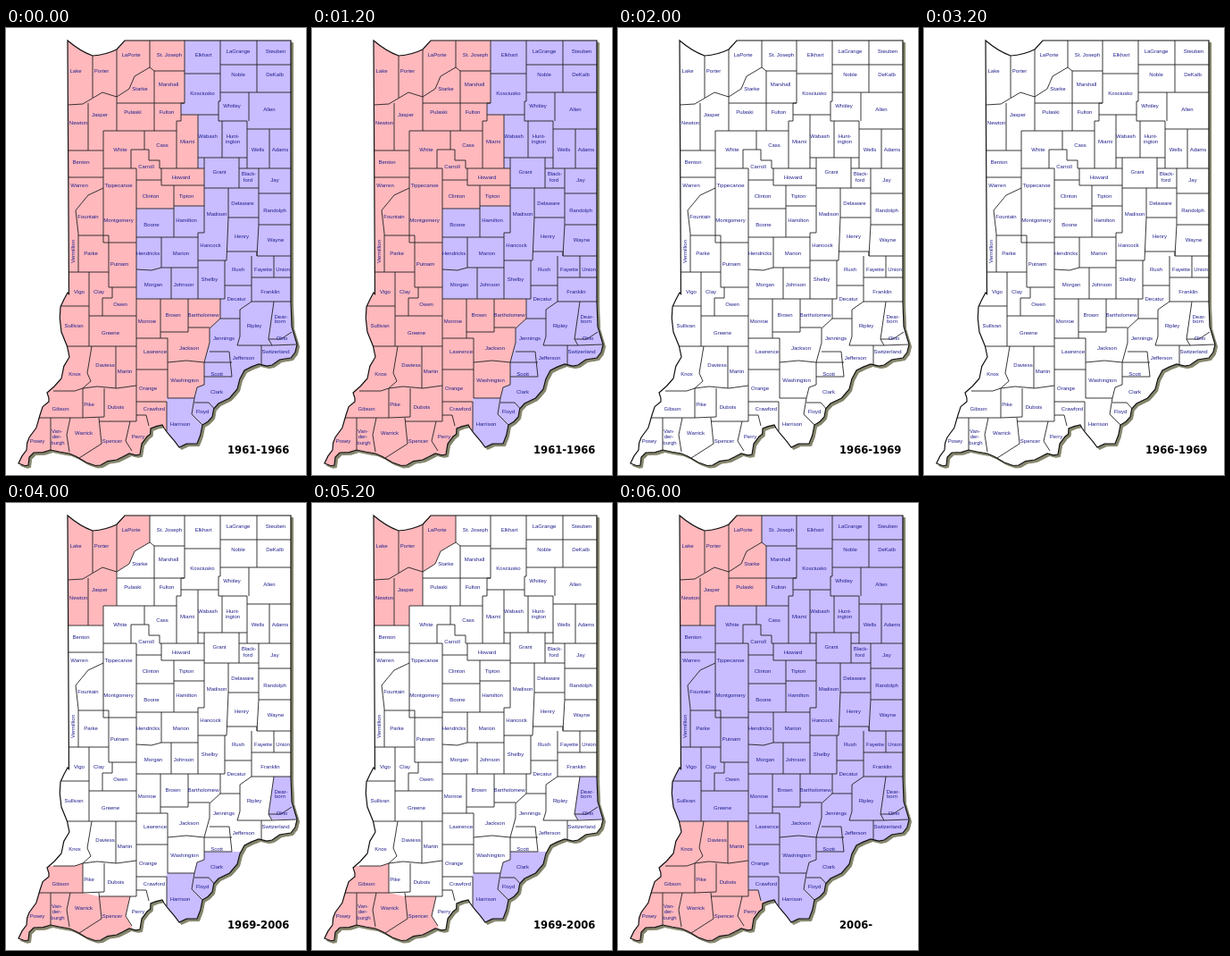
An HTML page for the animation above (8 s loop, 336x500 px).

```html
<!DOCTYPE html>
<html lang="en">
<head>
<meta charset="utf-8">
<title>Indiana time zones</title>
<style>
html, body { margin: 0; width: 100%; height: 100%; overflow: hidden; background: #fff; }
svg { display: block; width: 336px; height: 500px; }
#labels { font: 6px "Liberation Sans", Arial, sans-serif; fill: #20208c; text-anchor: middle; }
#year { font: bold 11.6px "DejaVu Sans", Verdana, sans-serif; }
#lines { fill: none; stroke: #222; stroke-width: .9; }
</style>
</head>
<body>
<svg viewBox="0 0 336 500">
  <defs>
    <path id="state"/>
    <clipPath id="clip"><use href="#state"/></clipPath>
  </defs>
  <use href="#state" x="2.5" y="2.5" fill="#85856c" stroke="#85856c"/>
  <use href="#state" fill="#fff"/>
  <g clip-path="url(#clip)">
    <path id="base" d="M0 0H336V500H0Z"/>
    <path id="pink" fill="#ffb8bc"/>
    <path id="purple" fill="#c9bcff"/>
    <g id="lines">
      <path d="M97 31V78M124 24V115M69 86L86 85 108 72 124 77 138 68 144 54 161 44V14M161 44L166 48H200M166 48V115M124 84H200M92 84V137M69 137H109M109 240V115H191"/>
      <path d="M200 14V84H196V97H238M191 157V104H196V97M200 51H240M240 14V82H238V104H270V157M240 41H319M281 14V72M240 72H319M272 72V104M270 113H319M295 113V157M215 97V157M242 104V145"/>
      <path d="M69 167H109M109 157H146V440M155 115V136H140V157M155 136H160V148H172V157H222M174 157V176H222M146 170H174M188 176V234M222 145V229H215V303M215 145H270M261 145V179M261 157H319"/>
      <path d="M222 179H283M283 157V220L281 255M249 179V212L247 260H215M283 185H319M249 212H283M283 220H319M188 199H222M146 202H188M146 234H215M109 179L92 187 78 204 81 230V273M81 232H115V290"/>
      <path d="M109 240H146M174 234V268M247 250H281V255H319M146 270L163 271 174 268H215M185 268V303M245 260V303M245 288H275M275 255V306H319M300 255V279M275 279H319M69 273H115M93 273V356M115 290H146M119 290V302H108V322M93 322H146"/>
      <path d="M146 303H245M240 303V325L228 336V352L222 374M62 311H93M173 303V347M173 340H204V303M204 335H228M146 347H181V374L202 372 222 374H253M275 306L262 315V345L259 355M240 325H262"/>
      <path d="M300 306L294 348 308 348 320 340M259 355H298L325 354M298 355L294 348M286 355V378M228 362H250L253 390M66 356H146M96 356L91 386 95 395 86 403M53 406H77L86 403 102 401 124 403 146 400M123 356V403"/>
      <path d="M86 403V436H29M50 436V473M72 436L68 455 71 474M110 403V435L86 436M104 440H146M104 436L107 465 82 481M139 440L134 462 141 473M146 433H157L160 445M146 382H181V374"/>
      <path d="M181 382V414M146 418H180V451M181 414H211L214 402 222 399V374M222 390H253M211 414L208 432 220 444M211 419H227L237 430"/>
    </g>
  </g>
  <use href="#state" fill="none" stroke="#111" stroke-width="1.2"/>
  <g id="labels"><text transform="translate(77 250) rotate(-90)">Vermillion</text></g>
  <text id="year" x="248" y="476"></text>
</svg>
<script>
const $ = id => document.getElementById(id);

// River banks: a jittered point goes between each pair of corners.
function rough(text) {
  const points = text.split(" ").map(p => p.split(",").map(Number));
  return points.map(([x, y], i) => {
    const [nx, ny] = points[i + 1] || [x, y];
    const shift = 2 * Math.sin(i * 2.4);
    return `L${x} ${y} ${(x + nx) / 2 + shift} ${(y + ny) / 2 + shift}`;
  }).join("");
}

const rivers = "320,334 326,354 319,369 298,377 283,376 267,383 259,404 238,420 231,435 220,444 214,465 194,469 181,453 175,444 162,448 158,457 150,477 138,476 124,483 106,489 90,486 71,476 50,472 31,475 25,489 14,487 23,472 26,458 38,433 48,418 46,408 62,392 71,368 62,340 61,312 69,296";
$("state").setAttribute("d", "M69 14Q83 26 97 31 112 30 124 24L133 14H319V306" + rough(rivers) + "Z");

// Each row: baseline, then names with their centres.
function addLabels(rows) {
  for (const row of rows.trim().split("\n")) {
    const [y, ...items] = row.trim().split("|");
    for (const item of items) {
      const [, name, x] = item.match(/(.+) (\d+)/);
      const label = document.createElementNS("http://www.w3.org/2000/svg", "text");
      label.setAttribute("x", x);
      label.setAttribute("y", y);
      label.textContent = name;
      $("labels").append(label);
    }
  }
}

addLabels(`
  28|LaGrange 260|Steuben 302
  32|LaPorte 140|St. Joseph 183|Elkhart 221
  50|Lake 78|Porter 107
  54|Noble 260|DeKalb 301
  65|Marshall 182
  70|Starke 150
  75|Kosciusko 220
  89|Whitley 253
  93|Allen 295
  96|Pulaski 142|Fulton 180
  99|Jasper 105
  108|Newton 81
  123|Wabash 226|Hunt- 254
  129|ington 254|Miami 203
  133|Cass 175
  138|White 128|Wells 282|Adams 307
  152|Benton 84
  157|Carroll 157
  163|Grant 239
  165|Black- 272
  169|Howard 196
  172|ford 271|Jay 301
  178|Warren 82|Tippecanoe 126
  190|Clinton 162|Tipton 202
  198|Delaware 265
  206|Randolph 301
  210|Madison 236
  213|Fountain 92
  217|Montgomery 126|Hamilton 202
  222|Boone 163
  235|Henry 264
  239|Wayne 302`);

const clarkWest = "L222 374V399L214 402 211 414H180";
const east = `M200 0V84H196V97H215V157H222V199H188V202H146V303H240V325L228 336V352${clarkWest}V500H336V0Z`;
const southeast = `M300 306H336V354H298L294 348ZM270 390H222${clarkWest}V500H270Z`;
const lakeside = "M60 0H161V44L";
const northwest = lakeside + "144 54 138 68 124 77V115H109V137H60Z";
const northwestWide = lakeside + "166 48V115H109V137H60Z";
const southwest = "M0 500V406H77L86 403V436L104 440H139L134 462 141 473V500Z";
const southwestWide = "M0 500V356H146V433H157L160 445 168 447V500Z";

addLabels(`
  245|Hancock 229
  254|Parke 95|Hendricks 159|Marion 196
  266|Putnam 127
  272|Rush 260|Fayette 288|Union 310
  283|Shelby 228
  289|Morgan 165|Johnson 199
  297|Vigo 82|Clay 104|Franklin 296
  305|Decatur 258
  311|Owen 128
  323|Brown 187|Bartholomew 221
  325|Dear- 308
  330|Monroe 158|born 307
  335|Sullivan 76|Ripley 278
  343|Greene 117
  349|Jennings 244|Ohio 309
  360|Jackson 205
  364|Lawrence 167|Switzerland 302
  371|Jefferson 266
  379|Daviess 111
  386|Martin 133
  389|Knox 77|Scott 236
  396|Washington 200
  405|Orange 159
  409|Clark 236
  423|Pike 93
  426|Dubois 123
  428|Gibson 61|Crawford 166
  431|Floyd 220
  445|Harrison 195
  453|Van- 57
  455|Warrick 87
  459|Perry 148|der- 57
  464|Posey 35|Spencer 119
  466|burgh 58`);

const pink = "#ffb8bc", purple = "#c9bcff";
const scenes = [
  { year: "1961-1966", base: pink, pink: "", purple: east },
  { year: "1966-1969", base: "#fff", pink: "", purple: "" },
  { year: "1969-2006", base: "#fff", pink: northwest + southwest, purple: southeast },
  { year: "2006-", base: purple, pink: northwestWide + southwestWide, purple: "" }
];

function draw() {
  const scene = scenes[Math.floor(performance.now() % 8000 / 2000)];
  $("base").setAttribute("fill", scene.base);
  $("pink").setAttribute("d", scene.pink);
  $("purple").setAttribute("d", scene.purple);
  $("year").textContent = scene.year;
  requestAnimationFrame(draw);
}
draw();
</script>
</body>
</html>
```
